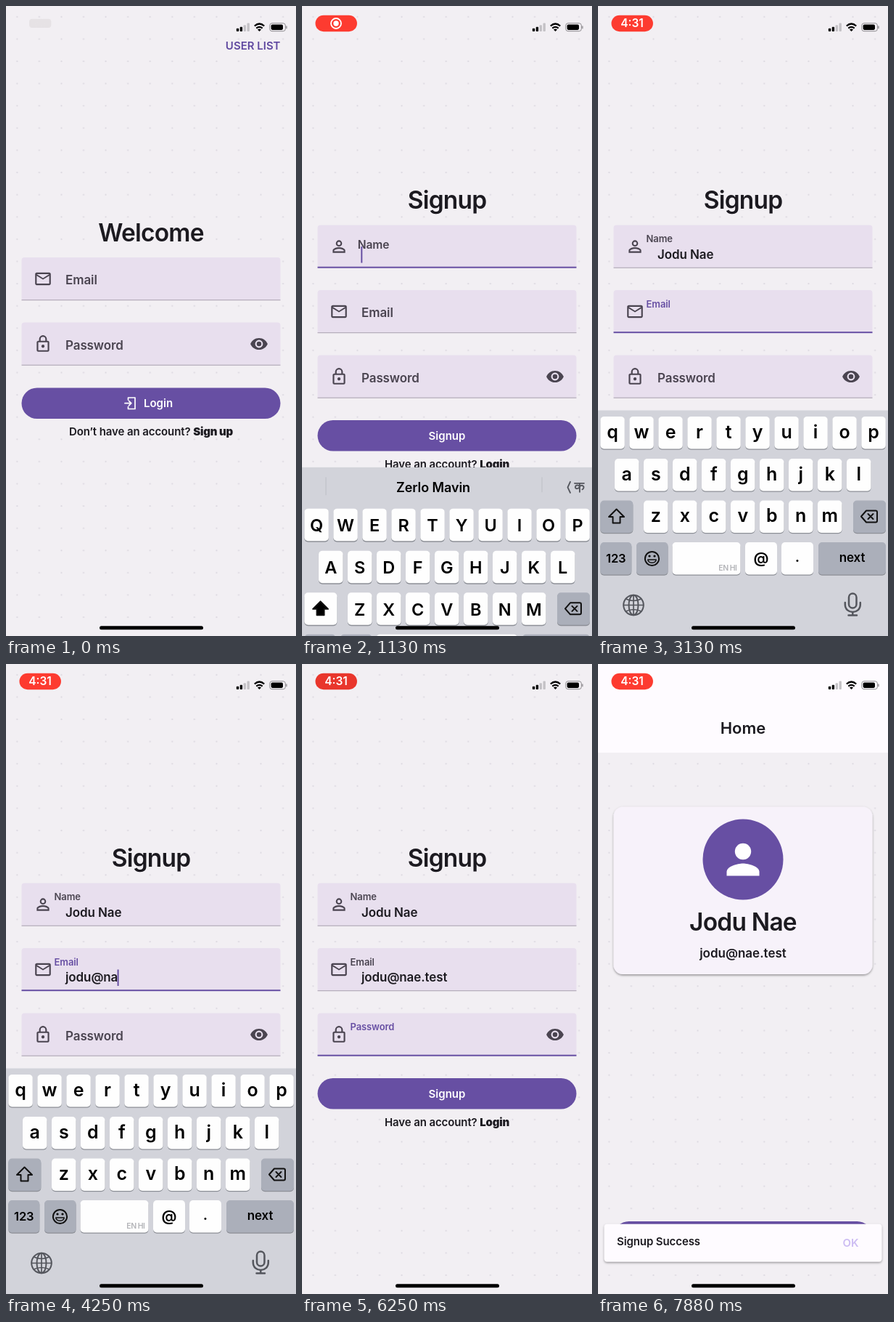
An HTML page that plays this animation: 400 by 867 pixels, repeating every 8000 ms.

```html
<!DOCTYPE html>
<html lang="en">
<head>
<meta charset="utf-8">
<title>Signup flow</title>
<style>
html, body { margin: 0; width: 100%; height: 100%; overflow: hidden; background: #f2eff3; }
svg { display: block; width: 100vw; height: 100vh; }
text { font-family: Inter, Roboto, sans-serif; font-weight: 560; fill: #1c1a20; letter-spacing: -.1px; white-space: pre; }
.mid { text-anchor: middle; }
.line { fill: none; stroke: #111; stroke-width: 2; stroke-linecap: round; stroke-linejoin: round; }
.soft { stroke: #54565d; }
.title { font-weight: 600; letter-spacing: -.8px; }
.hint { fill: #4a4450; }
.strong { font-weight: 600; letter-spacing: 0; }
.btn { font-weight: 600; fill: #fff; letter-spacing: 0; }
.link { font-weight: 900; letter-spacing: -.2px; }
.key { fill: #000; font-weight: 600; }
.lang { fill: #b3b4b8; font-weight: 600; letter-spacing: -.5px; }
</style>
</head>
<body>
<svg id="stage" viewBox="0 0 400 867" preserveAspectRatio="none"></svg>
<script>
const LOOP = 8000, PURPLE = '#674fa3', GREY = '#4a4450', KEYBOARD_H = 359;
const NAME = 'Jodu Nae', MAIL = 'jodu@nae.test';
const NAME_TIMES = [1500, 1640, 1770, 1900, 2150, 2350, 2550, 2700];
const MAIL_TIMES = [...MAIL].map((_, i) => 3380 + i * 125);

const ICONS = {
  user: 'M12 4a4 4 0 0 1 4 4 4 4 0 0 1-4 4 4 4 0 0 1-4-4 4 4 0 0 1 4-4m0 1.9a2.1 2.1 0 0 0 0 4.2 2.1 2.1 0 0 0 0-4.2m0 7.1c2.67 0 8 1.33 8 4v3H4v-3c0-2.67 5.33-4 8-4m0 1.9c-2.97 0-6.1 1.46-6.1 2.1v1.1h12.2V17c0-.64-3.13-2.1-6.1-2.1z',
  mail: 'M22 6c0-1.1-.9-2-2-2H4c-1.1 0-2 .9-2 2v12c0 1.1.9 2 2 2h16c1.1 0 2-.9 2-2V6m-2 0l-8 5-8-5h16m0 12H4V8l8 5 8-5v10z',
  lock: 'M12 17a2 2 0 0 1-2-2c0-1.11.89-2 2-2a2 2 0 0 1 2 2 2 2 0 0 1-2 2m6 3V10H6v10h12m0-12a2 2 0 0 1 2 2v10a2 2 0 0 1-2 2H6a2 2 0 0 1-2-2V10c0-1.11.89-2 2-2h1V6a5 5 0 0 1 5-5 5 5 0 0 1 5 5v2h1m-6-5a3 3 0 0 0-3 3v2h6V6a3 3 0 0 0-3-3z',
  eye: 'M12 9a3 3 0 0 0 0 6 3 3 0 0 0 0-6m0 8a5 5 0 0 1 0-10 5 5 0 0 1 0 10m0-12.5C7 4.5 2.73 7.61 1 12c1.73 4.39 6 7.5 11 7.5s9.27-3.11 11-7.5c-1.73-4.39-6-7.5-11-7.5z'
};

const text = (s, x, y, size, cls = '', extra = '') =>
  `<text x="${x}" y="${y}" font-size="${size}" class="${cls}" ${extra}>${s}</text>`;
const rect = (x, y, w, h, fill, r = 0, extra = '') =>
  `<rect x="${x}" y="${y}" width="${w}" height="${h}" rx="${r}" fill="${fill}" ${extra}/>`;
const icon = (name, x, y) =>
  `<path transform="translate(${x} ${y}) scale(1.08) translate(-12 -12)" fill="${GREY}" fill-rule="evenodd" d="${ICONS[name]}"/>`;
const line = (d, cls = '', extra = '') => `<path class="line ${cls}" d="${d}" ${extra}/>`;
const backdrop = () => rect(0, 0, 400, 867, '#f2eff3') + rect(0, 0, 400, 867, 'url(#dots)');
const mainButton = y => rect(21.5, y, 357, 42.5, PURPLE, 21.25);
const footer = (ask, link, y) =>
  text(`${ask} <tspan class="link">${link}</tspan>`, 200, y, 15, 'mid');

function field(id, label, glyph, y) {
  return `<g id="${id}">
    <path d="M21.5 ${y + 59}V${y + 4}q0-4 4-4h349q4 0 4 4V${y + 59}z" fill="#e8dfee"/>
    <rect class="rule" x="21.5" y="${y + 58.2}" width="357" height="1" fill="#aaa1b0"/>
    ${icon(glyph, 51, y + 29.5)}
    ${glyph === 'lock' ? icon('eye', 349, y + 29.5) : ''}
    ${text(label, 82, y + 37, 17, 'hint label')}
    ${text('', 82, y + 46, 17, 'value')}
    <rect class="caret" y="${y + 29.5}" width="2" height="22.5" fill="${PURPLE}" visibility="hidden"/>
  </g>`;
}

function loginScreen() {
  return backdrop() +
    text('USER LIST', 378.5, 60, 15, 'strong', 'text-anchor="end" style="fill:#6049a0"') +
    text('Welcome', 200, 324, 33.5, 'mid title') +
    field('loginMail', 'Email', 'mail', 346) + field('loginPass', 'Password', 'lock', 435.5) +
    mainButton(525.5) +
    line('M168.5 542v-3h9.5v15.5h-9.5v-3M164 546.7h8M169.5 543.5l3.3 3.2l-3.3 3.2', '', 'style="stroke:#fff;stroke-width:1.7"') +
    text('Login', 190, 552, 15, 'btn') +
    footer('Don’t have an account?', 'Sign up', 591);
}

function signupScreen() {
  return backdrop() + text('Signup', 200, 279, 33.5, 'mid title') +
    field('name', 'Name', 'user', 301.5) + field('mail', 'Email', 'mail', 391) +
    field('pass', 'Password', 'lock', 480.5) + mainButton(570) +
    text('Signup', 200, 596.5, 15, 'mid btn') +
    footer('Have an account?', 'Login', 635.5);
}

function homeScreen() {
  return backdrop() + rect(0, 0, 400, 122, '#fefbff') +
    text('Home', 200, 96, 22, 'mid strong') +
    rect(21.5, 196.5, 357, 230.5, '#f7f2fa', 13, 'filter="url(#shadow)"') +
    `<circle cx="200" cy="269" r="55.5" fill="${PURPLE}"/><circle cx="200" cy="258" r="11.2" fill="#fff"/>
     <path d="M177.5 291.5V286c0-7.5 15-11.5 22.5-11.5s22.5 4 22.5 11.5v5.5z" fill="#fff"/>` +
    text(NAME, 200, 367, 33.5, 'mid title') +
    text(MAIL, 200, 403.5, 17, 'mid strong') +
    mainButton(767) +
    `<g id="snack">${rect(8.7, 770.7, 382.6, 51.8, '#fefbff', 4, 'filter="url(#shadow)"')}
      ${text('Signup Success', 26, 800, 15)}
      ${text('OK', 337.5, 802, 15, 'strong', 'style="fill:#cdbdf3"')}</g>`;
}

const keyCap = (x, y, w, fill = '#fefefe') =>
  rect(x, y + 1.3, w, 44.5, '#8d9097', 5) + rect(x, y, w, 44.5, fill, 5);

function letterRows() {
  let caps = '', low = '', up = '';
  [['qwertyuiop', 3.3, 565], ['asdfghjkl', 23, 623], ['zxcvbnm', 63, 680.5]].forEach(([row, x0, y]) =>
    [...row].forEach((c, i) => {
      const x = x0 + i * 40;
      caps += keyCap(x, y, 33.5);
      low += text(c, x + 16.7, y + 29.5, 25, 'mid key');
      up += text(c.toUpperCase(), x + 16.7, y + 31.5, 23.5, 'mid key');
    }));
  return `${caps}<g id="lower">${low}</g><g id="upper">${up}</g>`;
}

function keyboard() {
  const dark = '#abafba';
  const arrow = 'M25.5 692.5l10.5 10.5h-5.5v8.5h-10v-8.5h-5.5z';
  const divider = d => line(d, '', 'style="stroke:#bcbec5;stroke-width:1"');
  const space = w => keyCap(102.5, 738, w) +
    text('EN HI', 97.5 + w, 777, 10.5, 'lang', 'text-anchor="end"');
  return rect(0, 508, 400, 359, '#d2d3da', 0, 'id="panel"') +
    `<g id="bar">
      <g id="guess">${divider('M33 522v24M331 522v20')}
        ${text('Zerlo Mavin', 181, 542, 18, 'mid key')}</g>
      <g id="blank">${divider('M121 523v25M242 523v25')}</g>
      ${line('M370 528l-3.5 7.5l3.5 7.5M376 530h13M383 530v12M383 534.5c-2-3-6-2-6 .8s4 3 6-.3M383 534.5c3-3 6-1 5.5 1.5q-.3 2-2 2.5', 'soft', 'style="stroke-width:1.9"')}
    </g>` + letterRows() +
    `<g id="shiftOff">${keyCap(3.3, 680.5, 45, dark)}${line(arrow)}</g>
     <g id="shiftOn">${keyCap(3.3, 680.5, 45)}<path class="line" d="${arrow}" style="fill:#000"/></g>` +
    keyCap(352, 680.5, 45, dark) +
    line('M363 702.5l7-8h13q2 0 2 2v12q0 2-2 2h-13zM372.5 699l7 7M379.5 699l-7 7') +
    keyCap(3.3, 738, 43, dark) + text('123', 24.8, 766, 16.5, 'mid key') +
    keyCap(53, 738, 43.5, dark) +
    `<circle class="line" cx="74.5" cy="760.5" r="9.6"/>
     <circle cx="71" cy="757" r="1.6"/><circle cx="78" cy="757" r="1.6"/>` +
    line('M68.8 762h11.4c-.5 5.5-10.9 5.5-11.400 0z', '', 'style="stroke-width:1.500"') +
    `<g id="wide">${space(194.5)}</g>
     <g id="short">${space(94)}${keyCap(203, 738, 44)}${text('@', 225, 767, 21, 'mid key')}
       ${keyCap(253, 738, 44)}${text('.', 275, 765, 20, 'mid key')}</g>` +
    keyCap(304, 738, 93, dark) + text('next', 350.5, 765, 17, 'mid key') +
    `<circle class="line soft" cx="49" cy="824.5" r="13.8"/><ellipse class="line soft" cx="49" cy="824.5" rx="6.5" ry="13.8"/>` +
    line('M49 811v27M35.5 824.5h27M38.5 816q10.5 5 21 0M38.5 833q10.5-5 21 0', 'soft', 'style="stroke-width:1.7"') +
    `<g style="stroke-width:2.5">${rect(346, 808.5, 10.5, 20, 'none', 5.25, 'class="line soft" style="stroke-width:inherit"')}
      ${line('M340.8 821v2.5c0 14 21 14 21 0V821M351.3 834v4.5M345.5 838.5h11.5', 'soft', 'style="stroke-width:inherit"')}</g>`;
}

function chrome() {
  const bars = [4.2, 6.2, 8.7, 11.5].map((h, i) =>
    rect(317.8 + i * 4.9, 35 - h, 3.4, h, i < 2 ? '#000' : '#c4c2c6', 1)).join('');
  return bars +
    line('M342.8 27.5q6.7-6 13.4 0M345.3 30.7q4.2-3.6 8.4 0', '', 'style="stroke:#000;stroke-width:2.3;stroke-linecap:butt"') +
    `<path d="M349.5 35l-2.5-2.6q2.5-2 5 0z"/>` +
    rect(363.8, 23.7, 21.6, 11, 'none', 3.2, 'stroke="#8e8c90"') +
    rect(365.6, 25.5, 16.4, 7.4, '#000', 1.8) + rect(386.3, 27.3, 1.3, 4, '#8e8c90', .6) +
    `<rect id="pill"/><g id="rec"><circle cx="47" cy="24" r="7" fill="none" stroke="#fff" stroke-width="1.8"/><circle cx="47" cy="24" r="3.7" fill="#fff"/></g>` +
    text('4:31', 47, 29.2, 15.5, 'mid strong', 'id="clock" style="fill:#fff"') +
    rect(129, 853.3, 143, 5, '#000', 2.5);
}

const $ = id => document.getElementById(id);
$('stage').innerHTML = `<defs>
  <pattern id="dots" width="30.57" height="30.6" patternUnits="userSpaceOnUse"><circle cx="15.3" cy="15" r="1.1" fill="#dcd9e0"/></pattern>
  <filter id="shadow" x="-5%" y="-20%" width="110%" height="150%"><feDropShadow dx="0" dy="1.5" stdDeviation="1.6" flood-color="#000" flood-opacity=".4"/></filter>
  </defs><g id="login">${loginScreen()}</g><g id="signup">${signupScreen()}</g>
  <g id="home">${homeScreen()}</g><g id="keys">${keyboard()}</g>${chrome()}`;

const ramp = (t, from, to) => Math.min(1, Math.max(0, (t - from) / (to - from)));
const lerp = (a, b, p) => a + (b - a) * p;
const easeOut = p => 1 - (1 - p) ** 3;
const show = (id, on) => $(id).setAttribute('visibility', on ? 'visible' : 'hidden');
const fade = (id, p) => $(id).setAttribute('opacity', p);
const shift = (id, x, y = 0) => $(id).setAttribute('transform', `translate(${x} ${y})`);
const set = (el, attrs) => { for (const k in attrs) el.setAttribute(k, attrs[k]); };
const typed = (s, times, t) => s.slice(0, times.filter(at => at <= t).length);

function drawField(id, top, t, start, end, value, caretFrom) {
  const part = cls => $(id).querySelector('.' + cls);
  const active = t >= start && t < end;
  const p = ramp(t, start, start + 150);
  const label = part('label'), text = part('value');
  set(label, { x: lerp(82, 66.5, p), y: top + lerp(37, 23.5, p), 'font-size': lerp(17, 13, p) });
  label.style.fill = active && p > .6 ? PURPLE : GREY;
  set(part('rule'), active
    ? { y: top + 57.2, height: 2, fill: PURPLE }
    : { y: top + 58.2, height: 1, fill: '#aaa1b0' });
  if (text.textContent !== value) text.textContent = value;
  const width = value ? text.getComputedTextLength() : 0;
  set(part('caret'), { x: 81.3 + width, visibility: active && t >= caretFrom ? 'inherit' : 'hidden' });
}

function drawPill(t) {
  const p = easeOut(ramp(t, 0, 250));
  const dip = 1 - .08 * Math.max(0, 1 - Math.abs(t - 6250) / 400);
  const w = lerp(30, 57.5, p), h = lerp(12, 22.5, p);
  const rgb = [[230, 253], [228, 59], [231, 48]].map(([a, b]) => Math.round(lerp(a, b, p) * dip));
  set($('pill'), { x: 47.2 - w / 2, y: 23.9 - h / 2, width: w, height: h, rx: lerp(4, 11.25, p), fill: `rgb(${rgb})` });
  const swap = ramp(t, 1450, 1800);
  fade('rec', p * (1 - swap));
  fade('clock', swap);
}

function draw(t) {
  const toSignup = easeOut(ramp(t, 230, 760)), toHome = easeOut(ramp(t, 7010, 7540));
  shift('login', -120 * toSignup);
  shift('signup', 400 * (1 - toSignup) - 120 * toHome);
  shift('home', 400 * (1 - toHome));
  show('home', toHome > 0);

  const pop = easeOut(ramp(t, 7480, 7720)), scale = lerp(.9, 1, pop);
  fade('snack', pop);
  set($('snack'), { transform: `translate(200 797) scale(${scale}) translate(-200 -797)` });

  drawField('name', 301.5, t, 1080, 2950, typed(NAME, NAME_TIMES, t), 1080);
  drawField('mail', 391, t, 2950, 5190, typed(MAIL, MAIL_TIMES, t), 3240);
  drawField('pass', 480.5, t, 5190, LOOP, '', LOOP);

  // The panel hides at once when the password field takes focus.
  const mailMode = t >= 2950;
  const capital = t < NAME_TIMES[0] || (t >= NAME_TIMES[4] && t < NAME_TIMES[5]);
  const up = easeOut(ramp(t, 1000, 1447));
  $('keys').style.display = up > 0 && t < 5190 ? '' : 'none';
  shift('keys', 0, KEYBOARD_H * (1 - up));
  set($('panel'), mailMode ? { y: 556.5, height: 311 } : { y: 508, height: 359 });
  $('bar').style.display = mailMode ? 'none' : '';
  show('guess', t < NAME_TIMES[0]);
  show('blank', t >= NAME_TIMES[0]);
  show('upper', capital);
  show('lower', !capital);
  show('shiftOn', capital);
  show('shiftOff', !capital);
  show('wide', !mailMode);
  show('short', mailMode);
  drawPill(t);
}

const begin = performance.now();
function tick() {
  draw((performance.now() - begin) % LOOP);
  requestAnimationFrame(tick);
}
tick();
</script>
</body>
</html>
```
